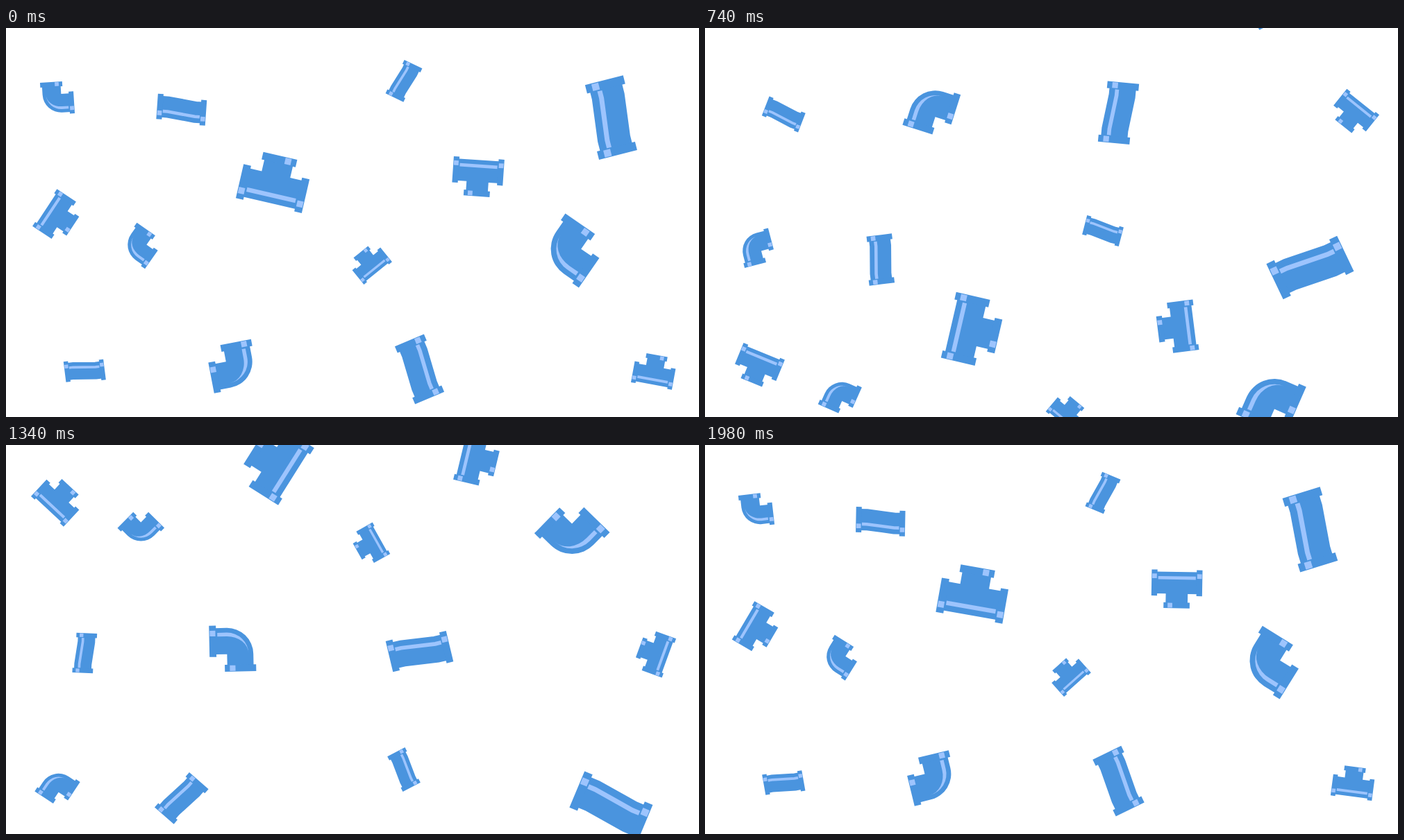
An HTML page for the animation above (2000 ms loop, 998 by 561 pixels).

```html
<!DOCTYPE html>
<html lang="en">
<head>
<meta charset="utf-8">
<title>Falling pipes</title>
<style>
  html, body { margin: 0; width: 100%; height: 100%; overflow: hidden; background: #fff; }
  svg { display: block; width: 998px; height: 561px; overflow: hidden; }
  .pipe { fill: #4a94de; }
  .bend { fill: none; stroke: #4a94de; stroke-width: 42; }
  .shine { fill: #9dc4fd; }
  .glint { fill: none; stroke: #9dc4fd; stroke-width: 6.2; }
</style>
</head>
<body>
<svg id="stage" viewBox="0 0 998 561">
  <defs>
    <!-- every part is drawn with flanges 50 units wide -->
    <g id="straight">
      <path class="bend" d="M-43 -3.1H-27L27 3.1H43"/>
      <path class="pipe" d="M-48.3 -28.1h11v50h-11zM37.3 -21.9h11v50h-11z"/>
      <path class="glint" d="M-36.5 -11.9H-27L27 -5.7H36.5"/>
      <path class="shine" d="M-47.3 -20.1h9v9h-9zM38.3 -13.9h9v9h-9z"/>
    </g>
    <g id="tee">
      <path class="pipe" d="M-43 -9.2H-21V-31H21V-9.2H43V32.8H-43z"/>
      <path class="pipe" d="M-48.6 -13.2h11v50h-11zM37.6 -13.2h11v50h-11zM-25 -36.8h50v11h-50z"/>
      <path class="glint" d="M-36 21.3H36"/>
      <path class="shine" d="M-47.6 20.1h9v9h-9zM38.6 20.1h9v9h-9zM8.2 -35.8h9v9h-9z"/>
    </g>
    <g id="elbow">
      <path class="pipe" d="M-33 28V9A42 42 0 0 1 9 -33H28V9H9V28z"/>
      <path class="pipe" d="M-37 26h50v11h-50zM26 -37h11v50h-11z"/>
      <path class="shine" d="M-25.5 24V9A34.5 34.5 0 0 1 9 -25.5A28.5 34.5 0 0 0 -19.5 9V24z"/>
      <path class="shine" d="M-29 27h9v9h-9zM27 -4h9v9h-9z"/>
    </g>
  </defs>
</svg>
<script>
const LOOP = 2000;
const LAP = 2005;      // time between two passes of the same part
const SPEED = 0.2923;  // px per ms

// shape, x, y and angle at the start of the loop, flange width, spin delay
const parts = [
  ['straight', 871.4, 129.2, -104.3, 56.6],
  ['straight', 252.8, 117.7, 184, 36.7],
  ['straight', 573, 76.3, -64.4, 28.6],
  ['straight', 595.5, 492, 67, 45.6],
  ['straight', 113.3, 494.3, -7.2, 29.7],
  ['tee', 386.7, 220.2, 13, 50.1],
  ['tee', 679.5, 215, 183.9, 37.6],
  ['tee', 76, 272.4, 123.4, 33],
  ['tee', 523.3, 338.3, -38.9, 26.8],
  ['tee', 933.5, 494, 10.4, 30.8],
  ['elbow', 74, 101, -93.6, 31.9],
  ['elbow', 815.2, 321, -55.3, 51.9],
  ['elbow', 194.3, 314, -54.9, 32.3],
  ['elbow', 326.3, 487.8, 169.2, 45.1]
];
const delays = { 5: 960 };

// shared spin: it speeds up, then slows down (ms, degrees)
const times = [280, 560, 940, 1340, 1640, 1980, 2285, 2565, 2945, 3345];
const turns = [-196.1, -170.5, -128.8, -80.2, -44.1, -2.7, 31.4, 61.9, 96.8, 127.2];
const last = times.length - 1;

function slope(i) {
  const a = Math.max(i - 1, 0), b = Math.min(i + 1, last);
  return (turns[b] - turns[a]) / (times[b] - times[a]);
}

function spin(t) {
  if (t <= times[0]) return turns[0] + (t - times[0]) * slope(0);
  if (t >= times[last]) return turns[last] + (t - times[last]) * slope(last);
  let i = 0;
  while (t > times[i + 1]) i++;
  const h = times[i + 1] - times[i];
  const s = (t - times[i]) / h, r = 1 - s;
  return turns[i] * r * r * (1 + 2 * s) + turns[i + 1] * s * s * (3 - 2 * s)
    + h * s * r * (slope(i) * r - slope(i + 1) * s);
}

const stage = document.getElementById('stage');
const pieces = [];
parts.forEach(([shape, x, y, angle, width], i) => {
  const delay = delays[i] || 0;
  const rest = angle - spin(LAP - delay);
  for (const lead of [0, LAP]) {
    const node = document.createElementNS(stage.namespaceURI, 'use');
    node.setAttribute('href', '#' + shape);
    stage.append(node);
    pieces.push({ node, x, y, rest, delay, lead, scale: width / 50 });
  }
});

function draw(now) {
  const t = now % LOOP;
  for (const p of pieces) {
    const age = t + p.lead;
    const y = p.y + (age - LAP) * SPEED;
    const angle = p.rest + spin(age - p.delay);
    p.node.setAttribute('transform',
      `translate(${p.x} ${y.toFixed(2)}) rotate(${angle.toFixed(2)}) scale(${p.scale})`);
  }
}

let start;
function tick(now) {
  start ??= now;
  draw(now - start);
  requestAnimationFrame(tick);
}
draw(0);
requestAnimationFrame(tick);
</script>
</body>
</html>
```
